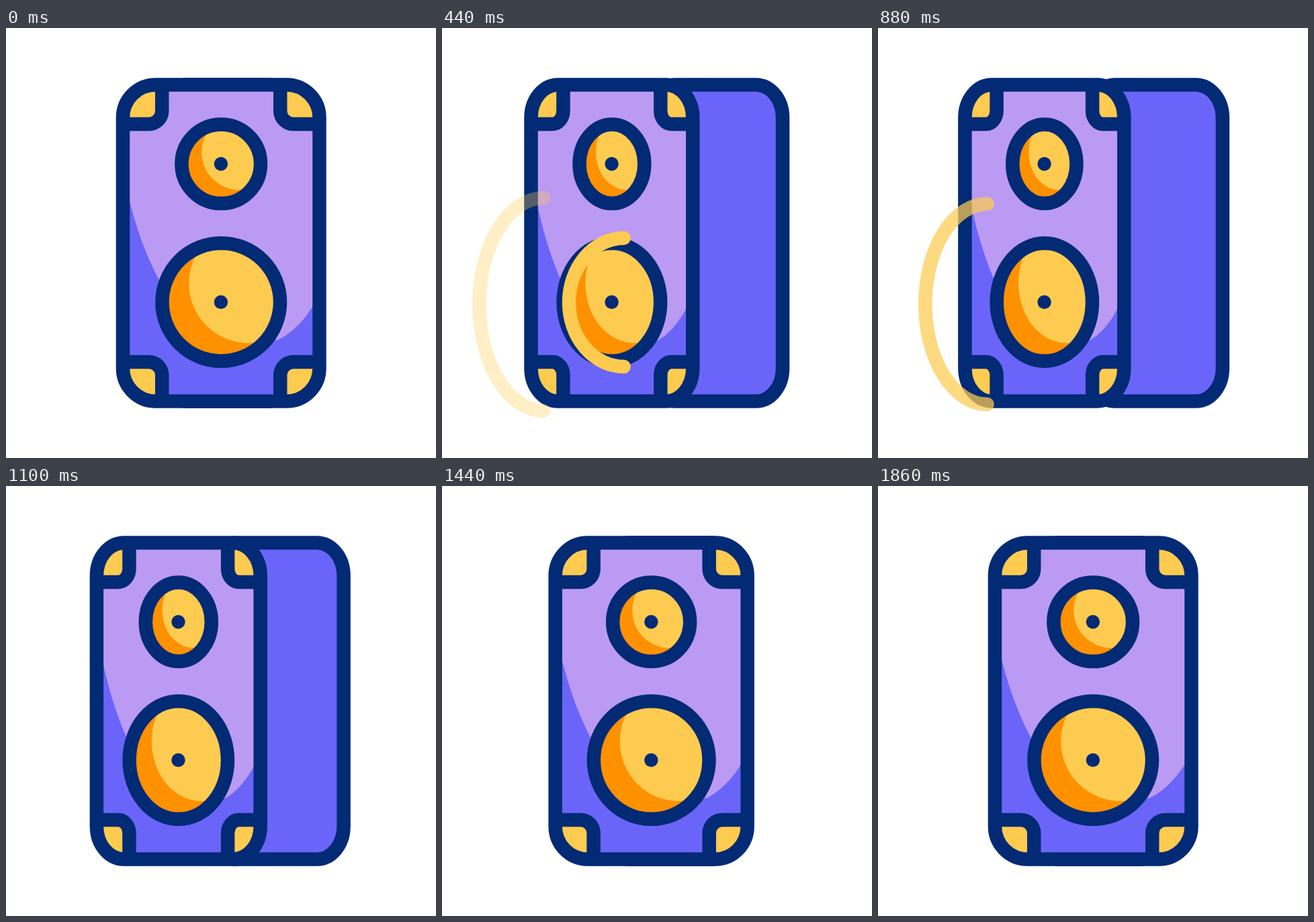
Recreate the animation shown at these times as an HTML page with a canvas. Size 640 by 640 pixels, loop 2400 ms.

```html
<!DOCTYPE html>
<html lang="en">
<head>
<meta charset="utf-8">
<title>Speaker</title>
<style>
html, body { margin: 0; width: 100%; height: 100%; overflow: hidden; background: #fff; }
canvas { display: block; width: 640px; height: 640px; }
</style>
</head>
<body>
<canvas id="stage" width="640" height="640"></canvas>
<script>
const ctx = document.getElementById('stage').getContext('2d');
const NAVY = '#032a75', LILAC = '#bb9af3', PURPLE = '#6a65f8';
const YELLOW = '#fdcb50', ORANGE = '#fe9100';
const LOOP = 2400, TURN = 650, BACK = 1860;
const LINE = 20.5, HALF_W = 146.25, HALF_H = 235.5;
const WAVE_STARTS = [86, 360, 583], WAVE_TIME = 400;

const lerp = (a, b, k) => a + (b - a) * k;
const clamp = v => Math.max(0, Math.min(1, v));
const smooth = u => u * u * (3 - 2 * u);

// cubic-bezier(.8, 0, .2, 1)
function ease(x) {
  if (x <= 0 || x >= 1) return clamp(x);
  let lo = 0, hi = 1;
  for (let i = 0; i < 24; i++) {
    const s = (lo + hi) / 2, r = 1 - s;
    const at = 2.4 * s * r * r + 0.6 * s * s * r + s * s * s;
    if (at < x) lo = s; else hi = s;
  }
  return smooth(lo);
}

function turn(t) {
  return t < TURN ? ease(t / TURN) : 1 - ease((t - TURN) / (BACK - TURN));
}

function pose(t) {
  const p = turn(t);
  return { p, x: 320.2 - 74.2 * p, k: 1 - 0.195 * p };
}

// Builds a path in squeezed space so that strokes keep an even width.
function squeezed(view, build) {
  ctx.save();
  ctx.translate(view.x, 320);
  ctx.scale(view.k, 1);
  ctx.beginPath();
  build();
  ctx.restore();
}

function fill(color) {
  ctx.fillStyle = color;
  ctx.fill();
}

function stroke(color) {
  ctx.strokeStyle = color;
  ctx.lineWidth = LINE;
  ctx.stroke();
}

function drawSide(p) {
  const right = 429 + 86 * p;
  ctx.beginPath();
  ctx.roundRect(right - 200, 320 - HALF_H, 200, 2 * HALF_H, [{ x: 40, y: 49 }]);
  fill(PURPLE);
  stroke(NAVY);
}

function shell() {
  ctx.roundRect(-HALF_W, -HALF_H, 2 * HALF_W, 2 * HALF_H, 49);
}

function sheen() {
  ctx.moveTo(-HALF_W, -110);
  ctx.quadraticCurveTo(-130, -15, -91, 58);
  ctx.lineTo(83, 145);
  ctx.quadraticCurveTo(113, 131, 136, 95);
  ctx.lineTo(HALF_W, 76);
  ctx.lineTo(HALF_W, -HALF_H);
  ctx.lineTo(-HALF_W, -HALF_H);
}

function bracket(sx, sy) {
  ctx.moveTo(sx * HALF_W, sy * 177);
  ctx.arcTo(sx * 88, sy * 177, sx * 88, sy * HALF_H, 19.5);
  ctx.lineTo(sx * 88, sy * HALF_H);
}

function drawFront(view) {
  ctx.save();
  squeezed(view, shell);
  ctx.clip();
  fill(PURPLE);
  squeezed(view, sheen);
  fill(LILAC);
  for (const sx of [-1, 1]) {
    for (const sy of [-1, 1]) {
      squeezed(view, () => {
        bracket(sx, sy);
        ctx.lineTo(sx * HALF_W, sy * HALF_H);
      });
      fill(YELLOW);
      squeezed(view, () => bracket(sx, sy));
      stroke(NAVY);
    }
  }
  ctx.restore();
  squeezed(view, shell);
  stroke(NAVY);
}

function drawCone(view, y, r, light) {
  const disc = () => ctx.arc(0, y, r, 0, 7);
  ctx.save();
  squeezed(view, disc);
  ctx.clip();
  fill(ORANGE);
  squeezed(view, () => ctx.arc(light.x, light.y, light.r, 0, 7));
  fill(YELLOW);
  ctx.restore();
  squeezed(view, disc);
  stroke(NAVY);
  ctx.beginPath();
  ctx.arc(view.x - 0.3, 320 + y, 10.2, 0, 7);
  fill(NAVY);
}

function drawWave(t, start) {
  const u = (t - start) / WAVE_TIME;
  if (u < 0 || u >= 1) return;
  const q = smooth(u), from = pose(t - 120);
  ctx.save();
  ctx.globalAlpha = clamp((1 - u) / 0.35);
  ctx.lineCap = 'round';
  ctx.beginPath();
  ctx.ellipse(lerp(from.x, 146.5, q), lerp(408, 411.5, q),
    lerp(87.8 * from.k, 96.5, q), lerp(87.8, 161, q),
    0, Math.PI / 2, Math.PI * 1.5);
  stroke(YELLOW);
  ctx.restore();
}

function draw(t) {
  const view = pose(t);
  ctx.fillStyle = '#fff';
  ctx.fillRect(0, 0, 640, 640);
  drawSide(view.p);
  drawFront(view);
  drawCone(view, -117.7, 58.8, { x: 27, y: -135, r: 56 });
  drawCone(view, 88, 87.8, { x: 41, y: 60, r: 89 });
  for (const start of WAVE_STARTS) drawWave(t, start);
}

const begin = performance.now();
function tick() {
  draw((performance.now() - begin) % LOOP);
  requestAnimationFrame(tick);
}
tick();
</script>
</body>
</html>
```
